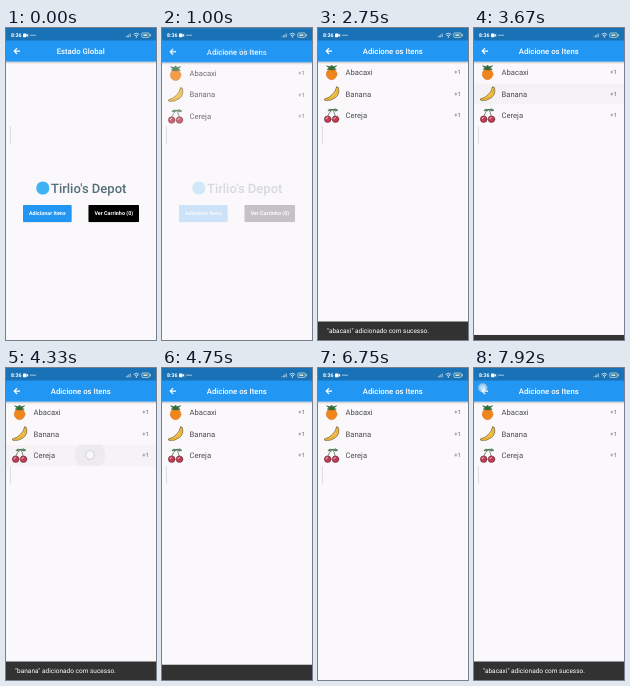
An HTML page for the animation above (8000 ms loop, 150 by 312 pixels).

```html
<!DOCTYPE html>
<html lang="pt">
<head>
<meta charset="utf-8">
<title>Estado Global</title>
<style>
html, body { margin: 0; width: 100%; height: 100%; overflow: hidden; background: #faf8fb; }
svg { display: block; width: 100vw; height: 100vh; font-family: Roboto, sans-serif; }
text { text-rendering: geometricPrecision; }
.bar-title { font-size: 7.75px; font-weight: 500; fill: #fff; text-anchor: middle; }
.store { font-size: 13px; font-weight: 500; fill: #546e7a; }
.btn { font-size: 5.4px; font-weight: 700; fill: #fff; text-anchor: middle; }
.item { font-size: 7.64px; fill: #4c4c4c; }
.count { font-size: 5.9px; fill: #666; text-anchor: end; }
.snack { font-size: 6.5px; fill: #fff; }
.clock { font-size: 5.2px; font-weight: 700; fill: #fff; }
</style>
</head>
<body>
<svg id="stage" viewBox="0 0 150 312" preserveAspectRatio="none">
  <defs>
    <linearGradient id="shade" x2="0" y2="1">
      <stop offset="0" stop-opacity=".26"/>
      <stop offset=".5" stop-opacity=".08"/>
      <stop offset="1" stop-opacity="0"/>
    </linearGradient>
    <clipPath id="inkClip"><rect id="inkBox"/></clipPath>
    <g id="header">
      <rect y="33.6" width="150" height="2.6" fill="url(#shade)"/>
      <rect width="150" height="33.6" fill="#2196f3"/>
      <path d="M14 23.1H8.5M11.1 20.2L8.2 23.1L11.1 26" fill="none" stroke="#fff" stroke-width="1.15"/>
    </g>
    <g id="ink" clip-path="url(#inkClip)">
      <rect id="glow"/>
      <circle id="splash"/>
    </g>
  </defs>

  <rect width="150" height="312" fill="#faf8fb"/>
  <g id="home">
    <use href="#header"/>
    <text class="bar-title" x="74.7" y="25.8">Estado Global</text>
    <circle cx="36.8" cy="160" r="6.6" fill="#41b2f3"/>
    <text class="store" x="45" y="164.8">Tirlio's Depot</text>
    <g>
      <rect x="17" y="177.5" width="48.6" height="17" rx="1" opacity=".14"/>
      <rect x="17" y="177" width="48.6" height="17" rx=".8" fill="#2196f3"/>
      <rect x="82.5" y="177.5" width="50.5" height="17" rx="1" opacity=".14"/>
      <rect x="82.5" y="177" width="50.5" height="17" rx=".8"/>
    </g>
    <use id="homeInk" href="#ink"/>
    <text class="btn" x="41.3" y="187.4">Adicionar Itens</text>
    <text class="btn" x="107.8" y="187.4">Ver Carrinho (0)</text>
  </g>

  <g id="list">
    <rect width="150" height="312" fill="#faf8fb"/>
    <use id="listInk" href="#ink"/>
    <use href="#header"/>
    <text class="bar-title" x="74.8" y="25.8">Adicione os Itens</text>
    <g id="rows"></g>
    <g stroke-linejoin="round" stroke-linecap="round">
      <ellipse cx="13.6" cy="46.2" rx="5.3" ry="5.5" fill="#f0851c" stroke="#d96f1c" stroke-width=".5"/>
      <path d="M13.6 42L9.2 41.2L11.1 40L8.5 37.8L12.2 38.7L13.6 37L15 38.7L18.7 37.8L16.1 40L18 41.2Z" fill="#2f7038" stroke="#28542f" stroke-width=".5"/>
      <path d="M18.5 59.2L20.2 59.2Q22.3 65.5 17.6 69.6Q12.6 73.4 6.9 72.4L6.3 71Q11.2 69.8 14.2 66.7Q17.8 63.4 18.5 59.2Z" fill="#f5c242" stroke="#5c4526" stroke-width=".6"/>
      <path d="M19.6 61.2Q19.6 66.4 15.7 68.9Q12.2 71.1 8.2 71.5" fill="none" stroke="#d99a25" stroke-width=".6"/>
      <path d="M9.8 88.2Q10.6 84.6 14.6 81.4Q16.6 84.6 17.2 88.2" fill="none" stroke="#4b5a45" stroke-width=".7"/>
      <path d="M14.4 81.6Q11.4 79.8 9.8 82.6Q12.4 84 14.4 81.6ZM14.8 81.6Q17.8 79.4 20 82.2Q17.4 84.4 14.8 81.6Z" fill="#5f9a68" stroke="#34503c" stroke-width=".4"/>
      <g fill="#c73a50" stroke="#5a2c39" stroke-width=".6">
        <circle cx="9.7" cy="91.2" r="3.3"/>
        <circle cx="17.5" cy="91.2" r="3.3"/>
      </g>
      <path d="M8.1 90.8Q8.4 89.6 9.5 89.5M15.9 90.8Q16.2 89.6 17.3 89.5" fill="none" stroke="#fbd5da" stroke-width=".9"/>
    </g>
    <g id="snackbar">
      <rect width="150" height="20" fill="#323232"/>
      <text id="message" class="snack" x="9" y="11.6"></text>
    </g>
  </g>

  <rect x="3.9" y="98" width="1" height="18" rx=".5" fill="#dddbdf"/>

  <g id="status">
    <rect width="150" height="12.5" opacity=".25"/>
    <text class="clock" x="5" y="9">8:36</text>
    <g fill="#fff">
      <rect x="17" y="5.4" width="3.6" height="3.8" rx=".6"/>
      <path d="M20.4 7.2L22.2 5.7V8.9Z"/>
      <circle cx="25" cy="7.2" r=".6"/><circle cx="27" cy="7.2" r=".6"/><circle cx="29" cy="7.2" r=".6"/>
      <path d="M119.6 9.2v-1h.8v1zM121 9.2v-1.8h.8v1.8zM122.4 9.2v-2.8h.8v2.8zM123.8 9.2v-3.8h.8v3.8z" opacity=".75"/>
      <circle cx="130.4" cy="8.9" r=".7"/>
    </g>
    <path d="M127.6 6.4Q130.4 4 133.2 6.4M128.8 7.7Q130.4 6.3 132 7.7" fill="none" stroke="#fff" stroke-width=".75"/>
    <g fill="none" stroke="#e3eed2">
      <rect x="135.8" y="5" width="7.4" height="4.4" rx="1" stroke-width=".7"/>
      <path d="M137.4 7.2H141.4" stroke-width="1.5"/>
      <path d="M144.3 6V8.4" stroke-width=".8"/>
    </g>
  </g>

  <g id="touch">
    <circle r="4.4" fill="#fff" fill-opacity=".5" stroke="#b9bcc2" stroke-opacity=".65" stroke-width=".8"/>
    <circle r="2.6" fill="#fff" opacity=".4"/>
  </g>
</svg>
<script>
const LOOP = 8000, ROW_TOP = 33.8, ROW_H = 21.4, BAR_H = 18.5, BAR_MS = 250;
const PUSH = 742, PUSH_MS = 300;
const BUTTON = { x: 17, y: 177, width: 48.6, height: 17 };
const fruits = ['Abacaxi', 'Banana', 'Cereja'];

const row = i => ({ x: 0, y: ROW_TOP + i * ROW_H, width: 150, height: ROW_H });
const taps = [
  { down: 420, up: 720, x: 46, y: 187, box: BUTTON },
  { down: 2330, up: 2490, x: 94, y: 39.5, box: row(0) },
  { down: 3330, up: 3487, x: 88, y: 66, box: row(1) },
  { down: 4250, up: 4365, x: 84, y: 87, box: row(2) },
  { down: 5750, up: 5864, x: 76.5, y: 42.5, box: row(0) },
  { down: 6380, up: 6500, x: 76.5, y: 42.5, box: row(0) },
  { down: 7920, up: LOOP, x: 8.8, y: 19.8 }
];
const snacks = [
  { show: 2490, hide: 3487, name: 'abacaxi' },
  { show: 3737, hide: 4365, name: 'banana' },
  { show: 4615, hide: 5864, name: 'cereja' },
  { show: 6114, hide: 6500, name: 'abacaxi' },
  { show: 6750, hide: Infinity, name: 'abacaxi' }
];

const $ = id => document.getElementById(id);
const set = (el, attrs) => { for (const k in attrs) el.setAttribute(k, attrs[k]); };
const clamp = v => Math.min(1, Math.max(0, v));

function bezier(x1, y1, x2, y2) {
  const at = (a, b, s) => 3 * (1 - s) * (1 - s) * s * a + 3 * (1 - s) * s * s * b + s * s * s;
  return x => {
    if (x <= 0 || x >= 1) return clamp(x);
    let lo = 0, hi = 1;
    for (let i = 0; i < 24; i++) {
      const mid = (lo + hi) / 2;
      if (at(x1, x2, mid) < x) lo = mid; else hi = mid;
    }
    return at(y1, y2, lo);
  };
}
const glide = bezier(.4, 0, .2, 1);
const easeIn = bezier(.42, 0, 1, 1);

$('rows').innerHTML = fruits.map((name, i) => {
  const y = ROW_TOP + (i + .5) * ROW_H;
  return `<text class="item" x="27.5" y="${y + 2.7}">${name}</text>` +
    `<text class="count" x="142.8" y="${y + 1.9}">+1</text>`;
}).join('');

function drawPages(t) {
  const p = clamp((t - PUSH) / PUSH_MS);
  set($('list'), {
    opacity: easeIn(p),
    transform: `translate(0 ${78 * (1 - glide(p))})`
  });
  $('home').style.display = p < 1 ? '' : 'none';
}

function drawTouch(t) {
  const tap = taps.find(k => t >= k.down && t < k.up);
  $('touch').style.display = tap ? '' : 'none';
  if (tap) set($('touch'), { transform: `translate(${tap.x} ${tap.y})` });
}

function drawInk(t) {
  const tap = taps.find(k => k.box && t >= k.down && t < k.up + 220);
  const onHome = tap && tap.box === BUTTON;
  $('homeInk').style.display = onHome ? '' : 'none';
  $('listInk').style.display = tap && !onHome ? '' : 'none';
  if (!tap) return;
  const fade = 1 - clamp((t - tap.up - 130) / 90);
  const age = t - tap.down;
  const fill = onHome ? '#fff' : '#000';
  const strength = onHome ? .16 : .03;
  set($('inkBox'), tap.box);
  set($('glow'), { ...tap.box, fill, opacity: strength * clamp(age / 120) * fade });
  set($('splash'), {
    cx: tap.x, cy: tap.y, fill, opacity: strength * fade,
    r: tap.box.width * glide(clamp(age / 450))
  });
}

function drawSnack(t) {
  const s = snacks.find(k => t >= k.show && t < k.hide + BAR_MS);
  $('snackbar').style.display = s ? '' : 'none';
  if (!s) return;
  const p = clamp((t - s.show) / BAR_MS) - clamp((t - s.hide) / BAR_MS);
  set($('snackbar'), { transform: `translate(0 ${312 - BAR_H * glide(p)})` });
  $('message').textContent = `"${s.name}" adicionado com sucesso.`;
  set($('message'), { opacity: t >= s.hide ? 1 : glide(clamp((p - .72) / .28)) });
}

function draw(now) {
  const t = now % LOOP;
  drawPages(t);
  drawTouch(t);
  drawInk(t);
  drawSnack(t);
}

const start = performance.now();
function tick() {
  draw(performance.now() - start);
  requestAnimationFrame(tick);
}
tick();
</script>
</body>
</html>
```
